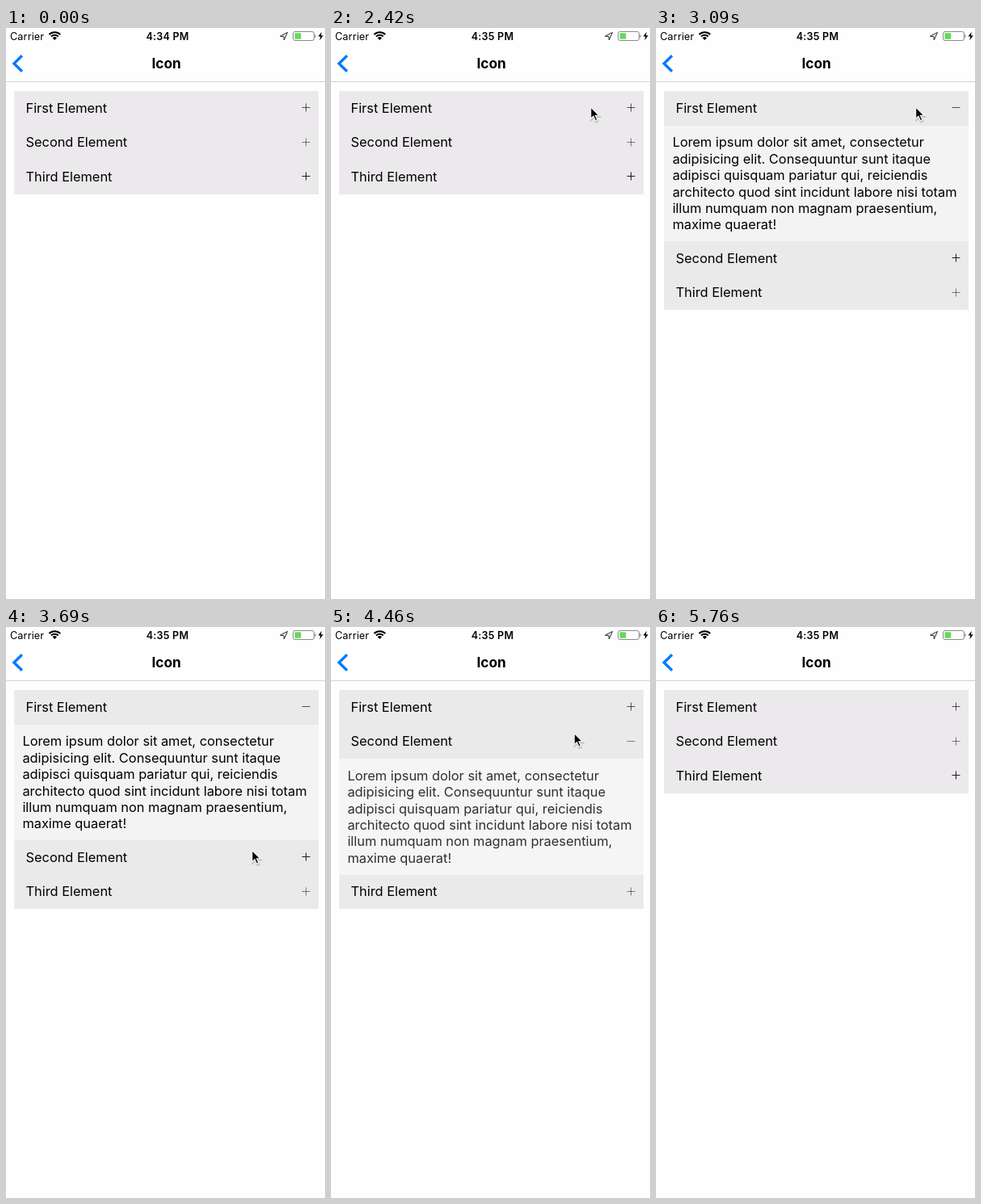
These frames come from a looping animation (395 px wide and 707 px high, 6.12 s). An HTML page:

```html
<!DOCTYPE html>
<html lang="en">
<head>
<meta charset="utf-8">
<title>Accordion</title>
<style>
  html, body { margin: 0; width: 100%; height: 100%; overflow: hidden; background: #fefefe; }
  svg { display: block; width: 100%; height: 100%; }
  text { font: 16.37px Inter, "Open Sans", sans-serif; }
  .status { font-size: 12.7px; letter-spacing: .1px; }
  .clock { font-size: 12.5px; font-weight: 600; letter-spacing: .25px; text-anchor: middle; }
  .title { font-size: 17.2px; font-weight: 700; text-anchor: middle; }
  .icon { fill: none; stroke: #1c1c1c; }
  #accordion rect { shape-rendering: crispEdges; }
</style>
</head>
<body>
<svg viewBox="0 0 395 707">
  <text class="status" x="5" y="14.5">Carrier</text>
  <g fill="none" stroke="#000" stroke-width="2.1">
    <path d="M53.4 8.1A9.8 9.8 0 0 1 67.2 8.1M55.9 10.6A6.3 6.3 0 0 1 64.7 10.6"/>
    <path d="M60.3 15L57.6 12.3A3.8 3.8 0 0 1 63 12.3Z" fill="#000" stroke="none"/>
  </g>
  <text class="clock" id="clock" x="200" y="14.5"></text>
  <path d="M348.5 5.5L339.5 10.2L343.9 10.5L344.3 14.9Z" fill="none" stroke="#222"/>
  <rect x="355.5" y="4.5" width="26" height="11" rx="2.5" fill="none" stroke="#8a8a8a"/>
  <rect x="357.5" y="6.3" width="7.8" height="7.4" rx="1" fill="#67d85b"/>
  <path d="M382.5 8A2.2 2.2 0 0 1 382.5 12Z" fill="#777"/>
  <path d="M390.8 4.8L386.6 10.6H389.3L388.4 15.2L392.8 9.2H390Z"/>

  <path d="M19.9 34.2L9.9 44L19.9 53.8" fill="none" stroke="#007aff" stroke-width="3.3"/>
  <text class="title" x="198.6" y="49.7">Icon</text>
  <rect y="66" width="395" height="1" fill="#d2d2d2"/>

  <g id="accordion"></g>

  <g id="cursor">
    <path d="M0 0V14.2L3.3 11.2L5.7 16.8L8.1 15.8L5.7 10.3H10.2Z" transform="translate(.5 1.5)"
      fill="none" stroke="#000" stroke-opacity=".16" stroke-width="2.4"/>
    <path d="M0 0V14.2L3.3 11.2L5.7 16.8L8.1 15.8L5.7 10.3H10.2Z" stroke="#fff" stroke-width="1.1"/>
  </g>
</svg>
<script>
const LOOP = 6120, TOP = 78, ROW = 42.5, PANEL = 143.5, LINE = 20.35;
const OPEN_FIRST = 2660, OPEN_SECOND = 4170, CLOSE = 5150;
const FADE = 430, FADE_LEAD = 20;
const titles = ["First Element", "Second Element", "Third Element"];
const lorem = [
  "Lorem ipsum dolor sit amet, consectetur",
  "adipisicing elit. Consequuntur sunt itaque",
  "adipisci quisquam pariatur qui, reiciendis",
  "architecto quod sint incidunt labore nisi totam",
  "illum numquam non magnam praesentium,",
  "maxime quaerat!"
];

const linear = p => p;
const easeIn = p => p * p;
const easeOut = p => 1 - (1 - p) ** 2;
const smooth = p => p * p * (3 - 2 * p);
const clamp = p => Math.min(1, Math.max(0, p));

// Cursor legs: start, end, visible until, from, to, easing.
const legs = [
  [1610, 1870, 1870, [255.7, 639.5], [395, 213], linear],
  [2080, 2420, 3320, [395, 107], [321.7, 98], easeOut],
  [3320, 3690, 4190, [321.7, 98], [304.7, 276.5], smooth],
  [4190, 4460, 4520, [304.7, 276.5], [301.2, 131.5], smooth],
  [4520, 4760, 4790, [301.2, 131.5], [303, 135.5], smooth],
  [4790, 4850, 5160, [303, 135.5], [303, 138], linear],
  [5160, 5430, 5430, [303, 138], [395, 508], easeIn],
  [5580, 5760, 5760, [394, 684], [377, 708], linear]
];

const byId = id => document.getElementById(id);
const clock = byId("clock"), cursor = byId("cursor"), accordion = byId("accordion");

accordion.innerHTML = titles.map(title => `<g class="row">
    <rect x="10" width="377" height="${ROW}"/>
    <text x="24.5">${title}</text>
    <path class="icon"/>
  </g>`).join("") + `<g id="panel">
    <rect x="10" width="377" height="${PANEL}" fill="#f3f3f3"/>
    ${lorem.map(line => `<text x="20.4">${line}</text>`).join("")}
  </g>`;
const rows = [...accordion.querySelectorAll(".row")].map(group => ({
  back: group.querySelector("rect"),
  label: group.querySelector("text"),
  icon: group.querySelector(".icon")
}));
const panel = byId("panel");
const panelBack = panel.querySelector("rect"), panelLines = panel.querySelectorAll("text");

// Icons and text baselines sit on whole pixels.
function drawRow({ back, label, icon }, y, isOpen, anyOpen) {
  back.setAttribute("y", y);
  back.setAttribute("fill", anyOpen ? "#eaeaea" : "#ebe9eb");
  label.setAttribute("y", Math.round(y + 26.9));
  const middle = Math.ceil(y) + 20.5;
  const bar = `M366.5 ${middle}H376.5`;
  icon.setAttribute("d", isOpen ? bar : `${bar}M371.5 ${middle - 5}v10`);
  icon.setAttribute("stroke-opacity", y % 1 ? .55 : y === TOP ? .75 : 1);
}

function drawPanel(y, opacity) {
  panel.setAttribute("opacity", opacity);
  panelBack.setAttribute("y", y);
  panelLines.forEach((line, i) => line.setAttribute("y", Math.round(y + 26.96 + i * LINE)));
}

function drawAccordion(t) {
  const open = t < OPEN_FIRST || t >= CLOSE ? -1 : t < OPEN_SECOND ? 0 : 1;
  const anyOpen = open >= 0;
  rows.forEach((row, i) =>
    drawRow(row, TOP + i * ROW + (anyOpen && i > open ? PANEL : 0), i === open, anyOpen));
  const start = (open === 1 ? OPEN_SECOND : OPEN_FIRST) - FADE_LEAD;
  drawPanel(TOP + (open + 1) * ROW, anyOpen ? smooth(clamp((t - start) / FADE)) : 0);
}

function drawCursor(t) {
  const leg = legs.find(([start, , until]) => t >= start && t < until);
  cursor.setAttribute("visibility", leg ? "visible" : "hidden");
  if (!leg) return;
  const [start, end, , from, to, ease] = leg;
  const p = ease(clamp((t - start) / (end - start)));
  const [x, y] = from.map((v, i) => v + (to[i] - v) * p);
  cursor.setAttribute("transform", `translate(${x} ${y})`);
}

function draw() {
  const t = performance.now() % LOOP;
  clock.textContent = t < 480 ? "4:34 PM" : "4:35 PM";
  drawAccordion(t);
  drawCursor(t);
  requestAnimationFrame(draw);
}
draw();
</script>
</body>
</html>
```
